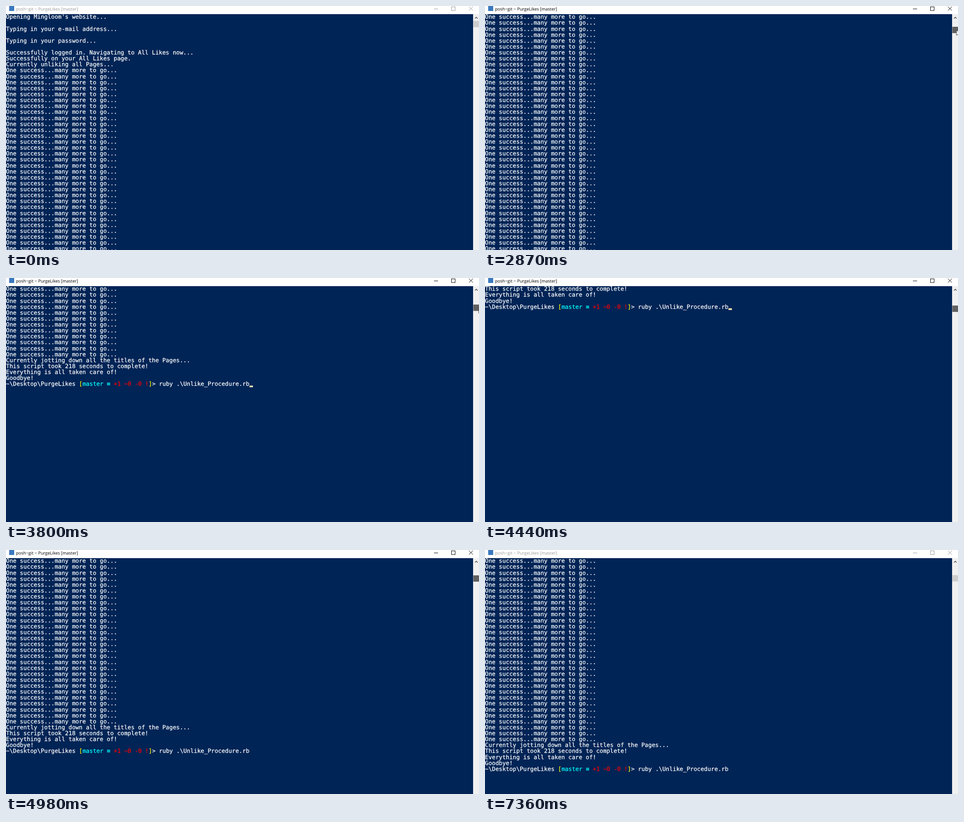
Recreate the animation shown at these times as an HTML page with a canvas. Size 1040x539 px, loop 7.45 s.

```html
<!DOCTYPE html>
<html lang="en">
<head>
<meta charset="utf-8">
<title>Terminal scrollback</title>
<style>
  html, body { margin: 0; width: 100%; height: 100%; overflow: hidden; background: #012456; }
  canvas { display: block; }
</style>
</head>
<body>
<canvas id="stage" width="1040" height="539"></canvas>
<script>
const ctx = document.getElementById('stage').getContext('2d');
const WIDTH = 1040, HEIGHT = 539, TOP = 18, BAR_X = 1027;
const ROW = 13.13, COL = 7.647, BASELINE = 10.3;
const LOOP = 7450, STEP = LOOP / 88, BLINK = 535;

const TEXT = '#fff';
const lines = [
  "Opening Mingloom's website...", '',
  'Typing in your e-mail address...', '',
  'Typing in your password...', '',
  'Successfully logged in. Navigating to All Likes now...',
  'Successfully on your All Likes page.',
  'Currently unliking all Pages...',
  ...Array(157).fill('One success...many more to go...'),
  'Currently jotting down all the titles of the Pages...',
  'This script took 218 seconds to complete!',
  'Everything is all taken care of!',
  'Goodbye!'
];
const prompt = [
  ['~\\Desktop\\PurgeLikes ', TEXT], ['[', '#ff0'], ['master ≡', '#0ff'],
  [' +1 ~0 -0 !', '#f00'], [']', '#ff0'], ['> ruby .\\Unlike_Procedure.rb', TEXT]
];

const between = (t, from, to) => t >= from && t < to;

// Smooth 0 to 1 while t runs from start to end
function ease(t, start, end) {
  const p = Math.min(1, Math.max(0, (t - start) / (end - start)));
  return p * p * (3 - 2 * p);
}

// Drag down to the prompt, overshoot, then pull back up
const scrollAt = t => Math.round(
  132 * ease(t, 2320, 3320) + 36 * ease(t, 3640, 3935)
  - 11 * ease(t, 4350, 4600) - 22 * ease(t, 4740, 5080));

const caretAt = t => t < 4870 || Math.floor((t - 4870) / BLINK) % 2 === 1;

function thumbColor(t) {
  if (between(t, 2320, 5840)) return '#606060';
  return between(t, 1360, 6090) ? '#a6a6a6' : '#cdcdcd';
}

function mouseAt(t, thumbY) {
  if (between(t, 160, 1200)) {
    const rise = ease(t, 100, 490), exit = ease(t, 700, 820);
    return [984 + 37 * rise + 19 * exit, 337 - 177 * rise - 82 * exit];
  }
  if (between(t, 1200, 5840)) {
    return [1040 - 4 * ease(t, 1200, 1400) + 4.5 * ease(t, 2320, 4600), thumbY + 7];
  }
  const fall = ease(t, 5840, 6500), exit = ease(t, 6620, 6880);
  return [1041 - 49 * fall - 46 * exit, thumbY + 7 + 458 * fall + 20 * exit];
}

function rect(x, y, w, h, color) {
  ctx.fillStyle = color;
  ctx.fillRect(x, y, w, h);
}

function polyline(points, color, width) {
  ctx.beginPath();
  points.forEach(([x, y]) => ctx.lineTo(x, y));
  ctx.strokeStyle = color;
  ctx.lineWidth = width;
  ctx.stroke();
}

function consoleText(string, x, y, color) {
  ctx.fillStyle = ctx.strokeStyle = color;
  ctx.lineWidth = 0.25;
  ctx.fillText(string, x, y);
  ctx.strokeText(string, x, y);
}

function drawPrompt(y, caretOn) {
  let x = 0;
  for (const [part, color] of prompt) {
    consoleText(part, x, y + BASELINE, color);
    x += part.length * COL;
  }
  if (caretOn) rect(x, y + 9.6, COL, 3.6, '#feedb5');
}

function drawConsole(scroll, caretOn) {
  rect(0, TOP, BAR_X, HEIGHT - TOP, '#012456');
  ctx.font = '12.7px "DejaVu Sans Mono", monospace';
  for (let row = 0; row < 40; row++) {
    const y = TOP + row * ROW, index = scroll + row;
    if (index < lines.length) consoleText(lines[index], 0, y + BASELINE, TEXT);
    if (index === lines.length) drawPrompt(y, caretOn);
  }
}

function drawTitleBar(active) {
  const ink = active ? '#000' : '#999';
  rect(0, 0, WIDTH, TOP, '#fff');
  rect(7, 0, 11, 11, '#3b78bd');
  ctx.font = '9.5px "Open Sans", sans-serif';
  ctx.fillStyle = ink;
  ctx.fillText('posh~git ~ PurgeLikes [master]', 22, 9.6);
  polyline([[941, 6.5], [950, 6.5]], ink, 1);
  ctx.strokeRect(979.5, 2, 8, 8);
  polyline([[1018, 1.5], [1026.5, 10]], ink, 1);
  polyline([[1026.5, 1.5], [1018, 10]], ink, 1);
}

function drawScrollBar(thumbY, color) {
  rect(BAR_X, TOP, WIDTH - BAR_X, HEIGHT - TOP, '#f0f0f0');
  polyline([[1031, 27.8], [1034, 24.8], [1037, 27.8]], '#505050', 1.5);
  rect(BAR_X + 0.5, thumbY, 12.5, 14, color);
}

function drawMouse([x, y]) {
  ctx.save();
  ctx.translate(x, y);
  const arrow = new Path2D('M0 0V12L2.7 9.5L4.7 14L6.6 13.2L4.7 8.9L8.6 8.7Z');
  ctx.fillStyle = '#fff';
  ctx.fill(arrow);
  ctx.strokeStyle = '#222';
  ctx.lineWidth = 0.8;
  ctx.stroke(arrow);
  ctx.restore();
}

function draw(now) {
  const t = Math.floor((now % LOOP) / STEP + 0.2) * STEP;
  const scroll = scrollAt(t);
  const thumbY = 32.8 + scroll * 0.168;
  drawConsole(scroll, caretAt(t));
  drawTitleBar(between(t, 1440, 7360));
  drawScrollBar(thumbY, thumbColor(t));
  if (between(t, 160, 6880)) drawMouse(mouseAt(t, thumbY));
}

ctx.textRendering = 'geometricPrecision';
const start = performance.now();
(function loop() {
  draw(performance.now() - start);
  requestAnimationFrame(loop);
})();
</script>
</body>
</html>
```
